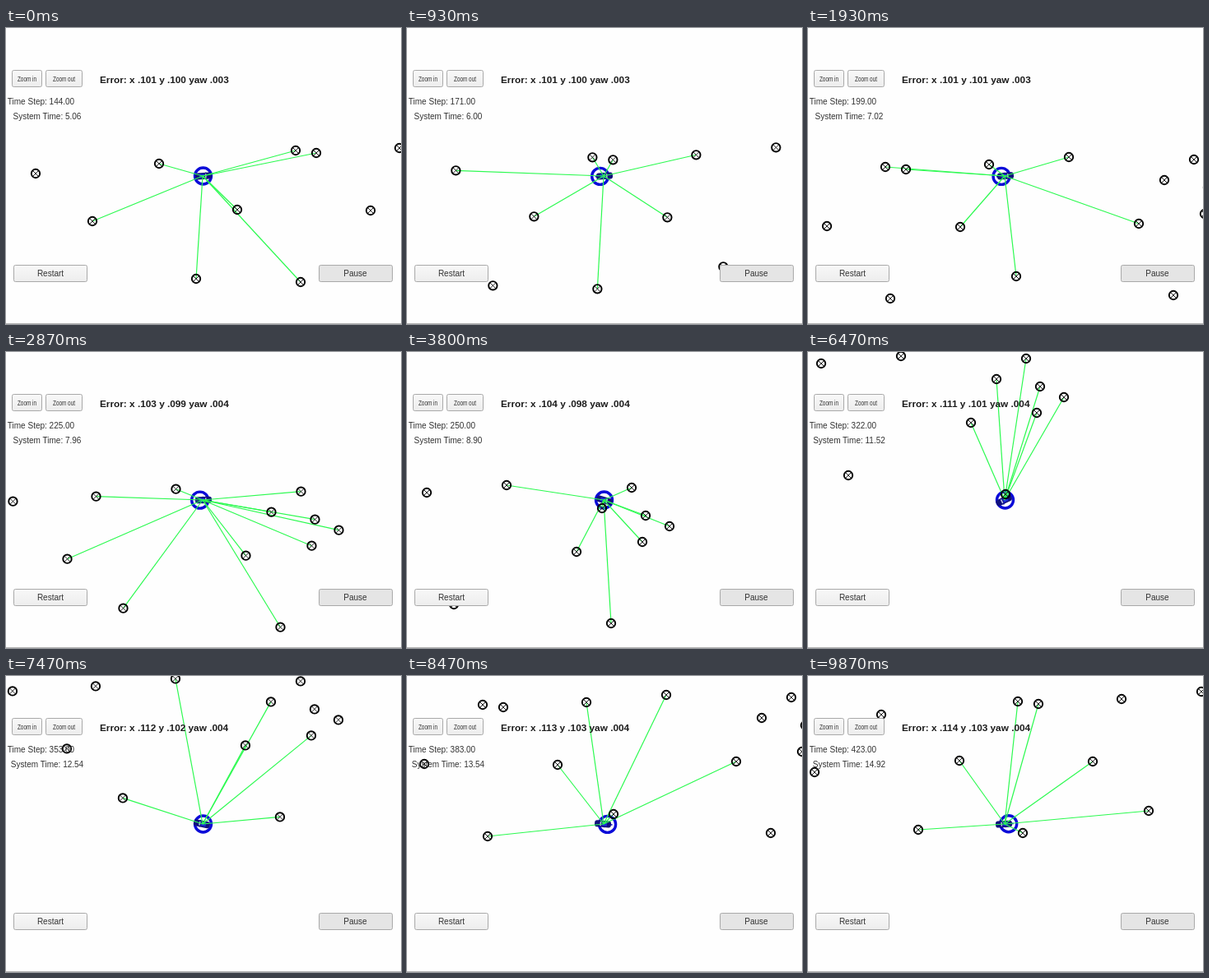
Animation of 480 by 360 pixels, one loop 9940 ms. Source, as an HTML page with a canvas:

```html
<!DOCTYPE html>
<html lang="en">
<head>
<meta charset="utf-8">
<title>Vehicle localization</title>
<style>
  html, body { margin: 0; width: 100%; height: 100%; overflow: hidden; background: #fefefe; }
  canvas, svg { position: absolute; left: 0; top: 0; width: 480px; height: 360px; display: block; }
  text { font: 10px "Liberation Sans", Arial, sans-serif; fill: #323232; text-anchor: middle; white-space: pre; }
  #error { font-size: 11.8px; font-weight: bold; fill: #1c1c1c; text-anchor: start; }
  .zoom text { font-size: 9px; }
  rect { fill: url(#face); stroke: #a9a9a9; }
  .held rect { fill: #e5e5e5; }
</style>
</head>
<body>
<canvas id="map" width="480" height="360"></canvas>
<svg viewBox="0 0 480 360">
  <defs>
    <linearGradient id="face" x2="0" y2="1">
      <stop offset="0" stop-color="#f8f8f8"/>
      <stop offset="1" stop-color="#ededed"/>
    </linearGradient>
  </defs>
  <g class="zoom">
    <rect x="7.5" y="51.5" width="36" height="20" rx="2"/>
    <text transform="translate(25.5 64.5) scale(.71 1)">Zoom in</text>
    <rect x="48.5" y="51.5" width="44" height="20" rx="2"/>
    <text transform="translate(70.5 64.5) scale(.71 1)">Zoom out</text>
  </g>
  <g>
    <rect x="9.5" y="288.5" width="89" height="20" rx="2"/>
    <text x="54" y="302">Restart</text>
  </g>
  <g class="held">
    <rect x="380.5" y="288.5" width="89" height="20" rx="2"/>
    <text x="424.5" y="302">Pause</text>
  </g>
  <text id="error" x="114" y="67"></text>
  <text id="step" x="42.5" y="93"></text>
  <text id="clock" x="50" y="111"></text>
  <path d="M0 359.5H480" stroke="#b4b4b4"/>
</svg>
<script>
const LOOP = 9940, RANGE = 182, CX = 239, CY = 180;
const $ = id => document.getElementById(id);
const ctx = $('map').getContext('2d');

const landmarks = [
  [36, 177], [105, 235], [186, 165], [231, 305], [281, 221], [352, 149],
  [377, 152], [358, 309], [443, 222], [478, 146], [511, 282], [575, 137],
  [660, 218], [691, 165], [727, 140], [702, 305], [740, 206], [744, 174], [773, 187]
];

// time in ms, then map offset x, y
const path = [
  [0, 0, 0], [1000, -136, 9], [1930, -258, 20], [3000, -382, 30],
  [3800, -454, 25], [4000, -467, 20], [5000, -507, -34], [6000, -491, -105],
  [6470, -462, -132], [7000, -415, -139], [8000, -313, -122],
  [8470, -260, -114], [9000, -199, -112], [9870, -97, -118]
];

// time in ms, then step, clock, error x, y, yaw (thousandths)
const readings = [
  [0, 144, 5.06, 101, 100, 3], [1930, 199, 7.02, 101, 101, 3],
  [3800, 250, 8.9, 104, 98, 4], [5000, 282, 10.06, 104, 100, 4],
  [6470, 322, 11.52, 111, 101, 4], [8470, 383, 13.54, 113, 103, 4],
  [9870, 423, 14.92, 114, 103, 4]
];

function segment(table, t) {
  let i = 0;
  while (i < table.length - 2 && t >= table[i + 1][0]) i++;
  return i;
}

function slope(i, axis) {
  const rate = k => (path[k + 1][axis] - path[k][axis]) / (path[k + 1][0] - path[k][0]);
  if (i === 0) return rate(0);
  if (i === path.length - 1) return rate(i - 1);
  const before = path[i][0] - path[i - 1][0], after = path[i + 1][0] - path[i][0];
  return (rate(i - 1) * after + rate(i) * before) / (before + after);
}

// cubic Hermite position and speed along one axis
function along(axis, t) {
  const i = segment(path, t), a = path[i], b = path[i + 1];
  const h = b[0] - a[0], u = (t - a[0]) / h, d = b[axis] - a[axis];
  const m0 = slope(i, axis) * h, m1 = slope(i + 1, axis) * h;
  const c2 = 3 * d - 2 * m0 - m1, c3 = m0 + m1 - 2 * d;
  return {
    pos: a[axis] + u * (m0 + u * (c2 + u * c3)),
    vel: (m0 + u * (2 * c2 + 3 * u * c3)) / h
  };
}

function read(t) {
  const i = segment(readings, t), a = readings[i], b = readings[i + 1];
  const u = (t - a[0]) / (b[0] - a[0]);
  return a.map((v, k) => v + (b[k] - v) * u);
}

function stroke(color, width, draw) {
  ctx.strokeStyle = color;
  ctx.lineWidth = width;
  ctx.beginPath();
  draw();
  ctx.stroke();
}

function drawMarker(x, y) {
  stroke('#000', 1.9, () => ctx.arc(x, y, 5.2, 0, 7));
  stroke('#222', 1, () => {
    ctx.moveTo(x - 3.5, y - 3.5); ctx.lineTo(x + 3.5, y + 3.5);
    ctx.moveTo(x + 3.5, y - 3.5); ctx.lineTo(x - 3.5, y + 3.5);
  });
}

function drawCar(angle) {
  ctx.save();
  ctx.translate(CX, CY);
  ctx.rotate(angle);
  ctx.fillStyle = '#10107c';
  ctx.beginPath();
  ctx.roundRect(-9, -4, 20, 8, 3);
  ctx.fill();
  ctx.fillStyle = '#1c28d8';
  ctx.fillRect(-4, -2.5, 6, 5);
  ctx.fillStyle = '#b8c4e8';
  ctx.fillRect(3, -2.5, 1.5, 5);
  ctx.restore();
}

function drawEstimate(x, y, angle) {
  stroke('#0a0ad8', 3.4, () => ctx.arc(x, y, 10, 0, 7));
  ctx.save();
  ctx.translate(x, y);
  ctx.rotate(angle);
  stroke('#0a0ad8', 1.6, () => {
    ctx.moveTo(-6, 0); ctx.lineTo(7, 0);
    ctx.moveTo(3, -4); ctx.lineTo(7, 0); ctx.lineTo(3, 4);
  });
  ctx.restore();
}

function drawMap(t, n) {
  const x = along(1, t), y = along(2, t);
  const angle = Math.atan2(-y.vel, -x.vel);
  const beat = n * 0.618 % 1;
  const lag = beat > 0.4 && beat < 0.94 ? 36 : 0;
  const spots = landmarks.map(([px, py]) => [px + x.pos, py + y.pos]);

  ctx.clearRect(0, 0, 480, 360);
  drawEstimate(CX + 0.5 + x.vel * lag, CY + y.vel * lag, angle);
  drawCar(angle);
  for (const [px, py] of spots) {
    if (Math.hypot(px - CX, py - CY) > RANGE) continue;
    stroke('#2cfa50', 1.2, () => { ctx.moveTo(CX, CY); ctx.lineTo(px, py); });
  }
  spots.forEach(p => drawMarker(...p));
}

function showReadings(t) {
  const [, step, clock, ...errors] = read(t);
  const [ex, ey, yaw] = errors.map(v => '.' + String(Math.round(v)).padStart(3, '0'));
  $('step').textContent = `Time Step: ${Math.round(step)}.00`;
  $('clock').textContent = `System Time: ${(Math.round(clock * 50) / 50).toFixed(2)}`;
  $('error').textContent = `Error: x ${ex} y ${ey} yaw ${yaw}`;
}

// fifteen pictures a second, each starting on a whole 10 ms
const startOf = n => Math.round(n * 20 / 3) * 10;
let shown = -1;

function tick() {
  const t = performance.now() % LOOP;
  let n = Math.floor((t + 4) * 0.015);
  if (startOf(n) > t) n--;
  n = Math.min(n, 148);
  if (n !== shown) {
    shown = n;
    drawMap(startOf(n), n);
    showReadings(startOf(n));
  }
  requestAnimationFrame(tick);
}
tick();
</script>
</body>
</html>
```
